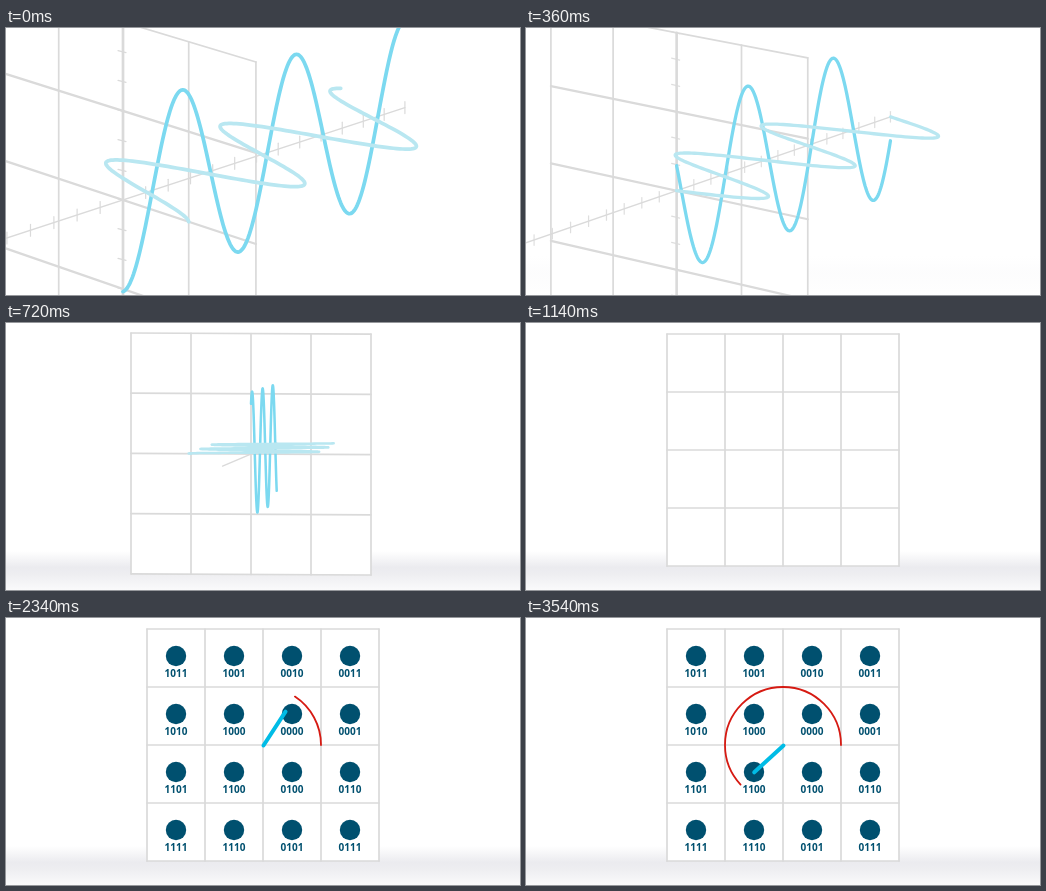
Write an HTML page with a canvas that moves like this. It is 514 px wide and 267 px high and loops after 3.78 s.

```html
<!DOCTYPE html>
<html lang="en">
<head>
<meta charset="utf-8">
<title>Constellation diagram</title>
<style>
  html, body { margin: 0; width: 100%; height: 100%; overflow: hidden; background: #fff; }
  canvas { display: block; }
</style>
</head>
<body>
<canvas id="stage" width="514" height="267"></canvas>
<script>
const W = 514, H = 267, LOOP = 3780, STEP = 60;
const ctx = document.getElementById('stage').getContext('2d');
const GRID = '#dadada', NAVY = '#00506f', CYAN = '#00bce6', RED = '#d61a12';
const LABELS = [
  ['1011', '1001', '0010', '0011'],
  ['1010', '1000', '0000', '0001'],
  ['1101', '1100', '0100', '0110'],
  ['1111', '1110', '0101', '0111'],
];

// Camera poses, 240 ms apart: origin, x unit, y unit, time axis, depth tilt, tick opacity, floor opacity
const POSES = [
  [117, 172, 65, 21.5, 89, 296, -97, .011, 1, 0],
  [127, 169, 64.5, 19.1, 85, 275, -91, .011, 1, 0],
  [181, 154, 63.5, 8.1, 72, 160, -59, .009, .7, .35],
  [245, 131, 60, .3, 60.2, 27, -11.5, 0, 0, 1],
  [257, 127, 58, 0, 58, 0, 0, 0, 0, 1],
];
const DEPTH = .05;

const ramp = (t, from, to) => Math.min(1, Math.max(0, (t - from) / (to - from)));
const ease = (t, from, to) => { const u = ramp(t, from, to); return u * u * (3 - 2 * u); };

function poseAt(t) {
  const last = POSES.length - 1;
  const i = Math.min(last - 1, Math.floor(t / 240));
  const u = Math.min(1, t / 240 - i), v = 1 - u;
  const slope = (k, j) => k === 0 || k === last ? 0 : (POSES[k + 1][j] - POSES[k - 1][j]) / 2;
  return POSES[i].map((a, j) =>
    v * v * (1 + 2 * u) * a + u * u * (3 - 2 * u) * POSES[i + 1][j] +
    u * v * v * slope(i, j) - u * u * v * slope(i + 1, j));
}

function stroke(points, color, width) {
  ctx.beginPath();
  points.forEach(p => ctx.lineTo(...p));
  ctx.strokeStyle = color;
  ctx.lineWidth = width;
  ctx.stroke();
}

function drawFloor(alpha) {
  const shade = ctx.createLinearGradient(0, 228, 0, H);
  shade.addColorStop(0, '#fff');
  shade.addColorStop(.42, '#ebebef');
  shade.addColorStop(.6, '#eeeef1');
  shade.addColorStop(1, '#fafafb');
  ctx.globalAlpha = ramp(alpha, 0, 1);
  ctx.fillStyle = shade;
  ctx.fillRect(0, 228, W, H - 228);
  ctx.globalAlpha = 1;
}

function drawScene(t) {
  const [ox, oy, xx, xy, unit, zx, zy, tilt, ticks, floor] = poseAt(t);
  const project = (x, y, z) => {
    const w = 1 - tilt * x + DEPTH * z;
    return [ox + (x * xx + z * zx) / w, oy + (x * xy - y * unit + z * zy) / w];
  };
  drawFloor(floor);

  ctx.beginPath();
  [[-2, 2], [2, 2], [2, -2], [-2, -2]].forEach(([x, y]) => ctx.lineTo(...project(x, y, 0)));
  ctx.fillStyle = '#fff';
  ctx.fill();
  for (let k = -2; k <= 2; k++) {
    const inner = Math.abs(k) < 2 ? ticks * .6 : 0;
    stroke([project(-2, k, 0), project(2, k, 0)], GRID, 1.7 + inner);
    stroke([project(k, -2, 0), project(k, 2, 0)], GRID, 1.7 + (k ? 0 : ticks));
  }

  const fade = 1 - ramp(t, 760, 1000);
  if (fade === 0) return;
  ctx.globalAlpha = fade;
  stroke([project(0, 0, -1), project(0, 0, 1)], GRID, 1.4);

  ctx.globalAlpha = fade * ramp(ticks, 0, 1);
  const tick = unit / 15;
  for (let k = -13; k <= 13; k++) {
    const [x, y] = project(0, 0, k / 13);
    stroke([[x, y - tick], [x, y + tick]], GRID, 1.2);
  }
  for (let k = -6; k <= 6; k++) {
    const [x, y] = project(0, k / 3, 0);
    stroke([[x - 5, y - 1], [x + 3, y + 1]], GRID, 1.2);
  }

  ctx.globalAlpha = fade;
  const samples = Array.from({ length: 251 }, (_, i) => i / 250);
  const phase = z => 2 * Math.PI * (z - t / 3000) / .4;
  stroke(samples.map(z => project(0, -1.03 * Math.cos(phase(z)), z)), '#7cd9f0', unit * .042);
  stroke(samples.map(z => project(1.05 * Math.cos(phase(z) + .31), 0, z)), '#b9e7f1', unit * .042);
  ctx.globalAlpha = 1;
}

function drawSymbols(t) {
  ctx.globalAlpha = ramp(t, 1260, 1740);
  ctx.fillStyle = NAVY;
  ctx.font = 'bold 10px "Open Sans", sans-serif';
  ctx.textAlign = 'center';
  LABELS.forEach((row, r) => row.forEach((label, c) => {
    const x = 170 + 58 * c, y = 38 + 58 * r;
    ctx.beginPath();
    ctx.arc(x, y, 10.2, 0, 2 * Math.PI);
    ctx.fill();
    ctx.fillText(label, x, y + 21);
  }));
  ctx.globalAlpha = 1;
}

function drawPhasor(t) {
  const grow = ease(t, 1860, 2160);
  if (grow === 0) return;
  const degrees = 45 * grow + 270 * ease(t, 2280, 2760) - 180 * ease(t, 2940, 3120) + 88 * ease(t, 3360, 3540);
  const angle = degrees * Math.PI / 180, reach = 40 * grow;
  ctx.beginPath();
  ctx.arc(257, 127, 58, 0, -angle, true);
  ctx.strokeStyle = RED;
  ctx.lineWidth = 1.8;
  ctx.stroke();
  stroke([[257.5, 127.5], [257.5 + reach * Math.cos(angle), 127 - reach * Math.sin(angle)]], CYAN, 4);
}

function draw(now) {
  const t = Math.floor(now % LOOP / STEP) * STEP;
  ctx.fillStyle = '#fff';
  ctx.fillRect(0, 0, W, H);
  ctx.lineCap = ctx.lineJoin = 'round';
  drawScene(t);
  drawSymbols(t);
  drawPhasor(t);
}

let start;
function loop(now) {
  start ??= now;
  draw(now - start);
  requestAnimationFrame(loop);
}
requestAnimationFrame(loop);
</script>
</body>
</html>
```
